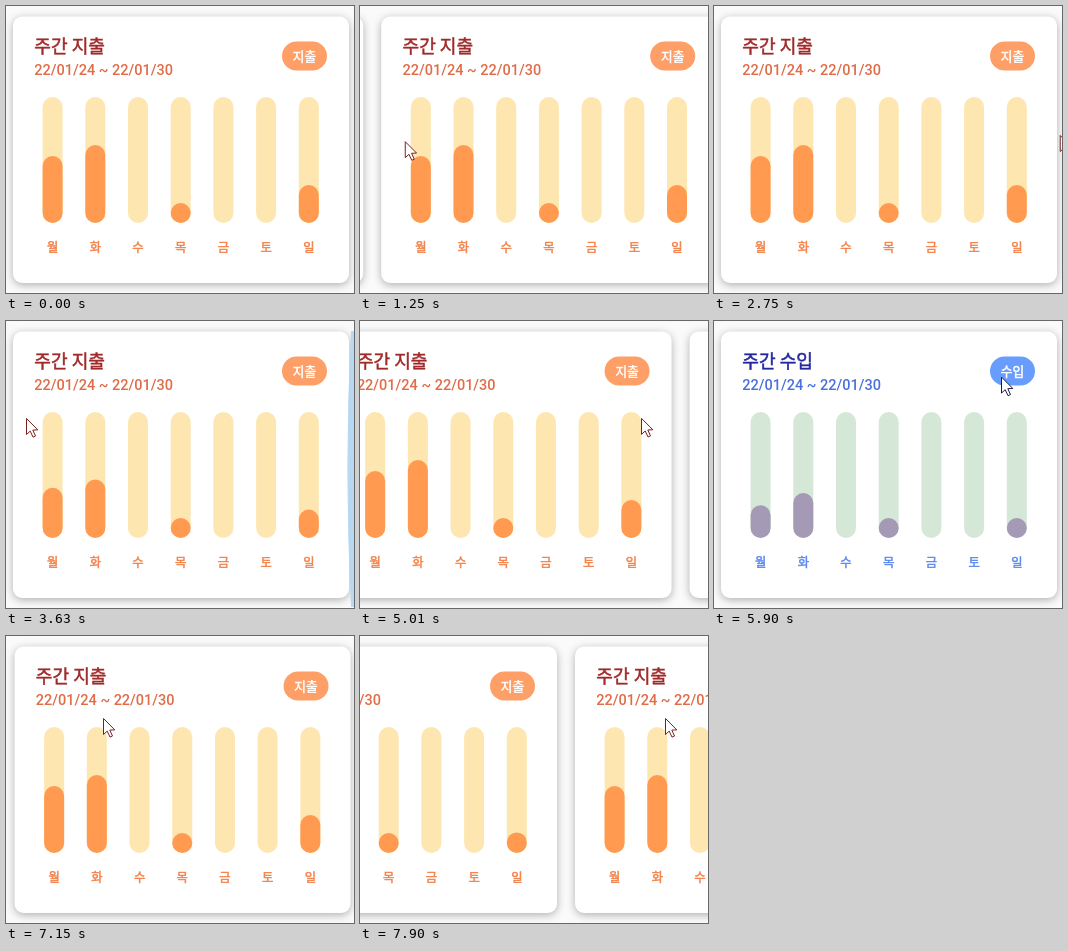
Write an HTML page with a canvas that moves like this. It is 348x287 px and loops after 8000 ms.

```html
<!DOCTYPE html>
<html lang="ko">
<head>
<meta charset="utf-8">
<title>주간 지출</title>
<style>
  html, body { margin: 0; width: 100%; height: 100%; overflow: hidden; background: #fafafa; }
  canvas { display: block; width: 348px; height: 287px; }
</style>
</head>
<body>
<canvas id="stage"></canvas>
<script>
const W = 348, H = 287, LOOP = 8000, PAGE = 354;
const STEP = 125.5, PHASE = 616;   // the picture advances in even steps
const SETTLE = 100, GROW = 400, BUILD_DELAY = 18, OVERSCROLL = 6;
const MIN_FILL = 20, BAR_TOP = 91, BAR_BOTTOM = 217;

const canvas = document.getElementById('stage');
const ctx = canvas.getContext('2d');
const ratio = window.devicePixelRatio || 1;
canvas.width = W * ratio;
canvas.height = H * ratio;

const KOREAN = '"Noto Sans CJK KR", "Noto Sans CJK", sans-serif';
const DAYS = [...'월화수목금토일'];
const PERIOD = '22/01/24 ~ 22/01/30';

const EXPENSE = {
  label: '지출', values: [67, 78, 0, 18, 0, 0, 38],
  title: '#a02a2a', period: '#e06c48', day: '#f4824a', button: '#ff9f68',
  track: [253, 230, 176], fill: [255, 154, 80], cursor: '#7c1f1f'
};
const INCOME = {
  label: '수입', values: [10, 23, 0, 18, 0, 0, 8],
  title: '#25289c', period: '#4a70de', day: '#5a8af0', button: '#689dfe',
  track: [186, 232, 240], fill: [104, 154, 250], cursor: '#1c1c40'
};

// Pointer gestures: a sideways drag swipes to the other page, one in place is a tap.
const GESTURES = [
  { start: 610, drag: 500, x0: 345, x1: 45, y: 135 },
  { start: 1480, drag: 355, x0: 40, x1: 335, y: 139 },
  { start: 3310, drag: 310, x0: 380, x1: 20, y: 97 },
  { start: 4130, drag: 770, x0: 20, x1: 281, y: 97 },
  { start: 5647, drag: 0, x0: 287, x1: 287, y: 55 },
  { start: 6510, drag: 165, x0: 287, x1: 97, y: 82 },
  { start: 7660, drag: 235, x0: 97, x1: 305, y: 82 }
];
const SWIPES = GESTURES.filter(g => g.drag);
const TAP = GESTURES.find(g => !g.drag);
const targetPage = g => g.x1 < g.x0 ? 1 : 0;

const clamp = v => Math.min(1, Math.max(0, v));
const mix = (a, b, k) => a + (b - a) * k;
const mixColor = (a, b, k) => `rgb(${a.map((v, i) => Math.round(mix(v, b[i], k)))})`;

// The page follows the finger, then settles exponentially.
function scrollAt(t) {
  const swipe = SWIPES.findLast(g => g.start <= t);
  if (!swipe) return 0;
  const { start, drag, x0, x1 } = swipe;
  const target = targetPage(swipe) * PAGE;
  const held = PAGE - target + (x0 - x1) * clamp((t - start) / drag);
  const released = Math.max(0, t - start - drag);
  return mix(target, held, Math.exp(-released / SETTLE));
}

function cursorAt(t) {
  const i = GESTURES.findLastIndex(g => g.start <= t);
  const last = GESTURES[i] ?? { start: 0, drag: 0, x1: 380, y: 150 };
  const end = last.start + last.drag;
  if (t < end) return [mix(last.x0, last.x1, (t - last.start) / last.drag), last.y];
  const next = GESTURES[i + 1];
  if (!next) return [last.x1, last.y];
  const k = ((t - end) / (next.start - end)) ** 3;
  return [mix(last.x1, next.x0, k), mix(last.y, next.y, k)];
}

function cardState(page, t) {
  const swipe = SWIPES.findLast(g => targetPage(g) === page && g.start + BUILD_DELAY <= t);
  const built = swipe ? swipe.start + BUILD_DELAY : -GROW;
  const income = page === 0 && t >= TAP.start && built < TAP.start;
  return {
    theme: income ? INCOME : EXPENSE,
    blend: income ? clamp((t - TAP.start) / GROW) : 0,
    grown: clamp((t - built) / GROW)
  };
}

function pill(x, y, w, h, r, color) {
  ctx.fillStyle = color;
  ctx.beginPath();
  ctx.roundRect(x, y, w, h, r);
  ctx.fill();
}

function text(str, x, y, font, color, align = 'left') {
  ctx.font = font;
  ctx.fillStyle = color;
  ctx.textAlign = align;
  ctx.fillText(str, x, y);
}

// A hairline stroke brings the regular cut to medium weight.
function hangul(str, x, y, size, color, align) {
  text(str, x, y, `${size}px ${KOREAN}`, color, align);
  ctx.strokeStyle = color;
  ctx.lineWidth = 0.5;
  ctx.strokeText(str, x, y);
}

function drawCard(x, { theme, blend, grown }) {
  ctx.save();
  ctx.translate(x, 0);
  ctx.save();
  ctx.shadowColor = 'rgba(0,0,0,0.3)';
  ctx.shadowBlur = 9 * ratio;
  ctx.shadowOffsetY = 2 * ratio;
  pill(7, 10.5, 336, 266.5, 9, '#fff');
  ctx.restore();

  hangul('주간 ' + theme.label, 28.3, 47.3, 18.1, theme.title);
  text(PERIOD, 28.3, 69.2, '500 14.5px Roboto, sans-serif', theme.period);
  pill(276, 35.5, 45, 29, 14.5, theme.button);
  hangul(theme.label, 298.5, 54.6, 12.7, '#fff', 'center');

  const trackColor = mixColor(EXPENSE.track, INCOME.track, blend);
  const fillColor = mixColor(EXPENSE.fill, INCOME.fill, blend);
  DAYS.forEach((day, i) => {
    const cx = 46.6 + i * 42.7;
    pill(cx - 10, BAR_TOP, 20, BAR_BOTTOM - BAR_TOP, 10, trackColor);
    if (theme.values[i]) {
      const value = mix(EXPENSE.values[i], INCOME.values[i], blend) * grown;
      const h = Math.max(MIN_FILL, value);
      pill(cx - 10, BAR_BOTTOM - h, 20, h, 10, fillColor);
    }
    hangul(day, cx, 246.2, 12.3, theme.day, 'center');
  });
  ctx.restore();
}

function drawGlow(strength) {
  ctx.save();
  ctx.globalAlpha = strength;
  ctx.fillStyle = '#b3d7f1';
  ctx.beginPath();
  ctx.moveTo(W, 10);
  ctx.lineTo(W - 3, 10);
  ctx.quadraticCurveTo(W - 3 - 8 * strength, 148, W - 3, 286);
  ctx.lineTo(W, 286);
  ctx.fill();
  ctx.restore();
}

function drawCursor(x, y, color) {
  const outline = [[0, 0], [0, 16], [3.7, 12.6], [6.5, 18.6], [9, 17.5], [6.3, 11.6], [11.3, 11.4]];
  ctx.beginPath();
  outline.forEach(([dx, dy]) => ctx.lineTo(x + dx + 0.5, y + dy + 0.5));
  ctx.closePath();
  ctx.fillStyle = '#fff';
  ctx.fill();
  ctx.strokeStyle = color;
  ctx.lineWidth = 1;
  ctx.stroke();
}

function draw(t) {
  ctx.setTransform(ratio, 0, 0, ratio, 0, 0);
  ctx.fillStyle = '#fafafa';
  ctx.fillRect(0, 0, W, H);
  const pull = scrollAt(t);
  const scroll = clamp(pull / PAGE) * PAGE;
  const cards = [0, 1].map(page => cardState(page, t));
  cards.forEach((card, page) => drawCard(page * PAGE - scroll, card));
  drawGlow(clamp((pull - PAGE) / OVERSCROLL));
  drawCursor(...cursorAt(t), cards[Math.round(scroll / PAGE)].theme.cursor);
}

const begin = performance.now();
function frame() {
  const t = (performance.now() - begin) % LOOP;
  draw(Math.max(0, PHASE + Math.floor((t - PHASE) / STEP) * STEP));
  requestAnimationFrame(frame);
}
frame();
</script>
</body>
</html>
```
